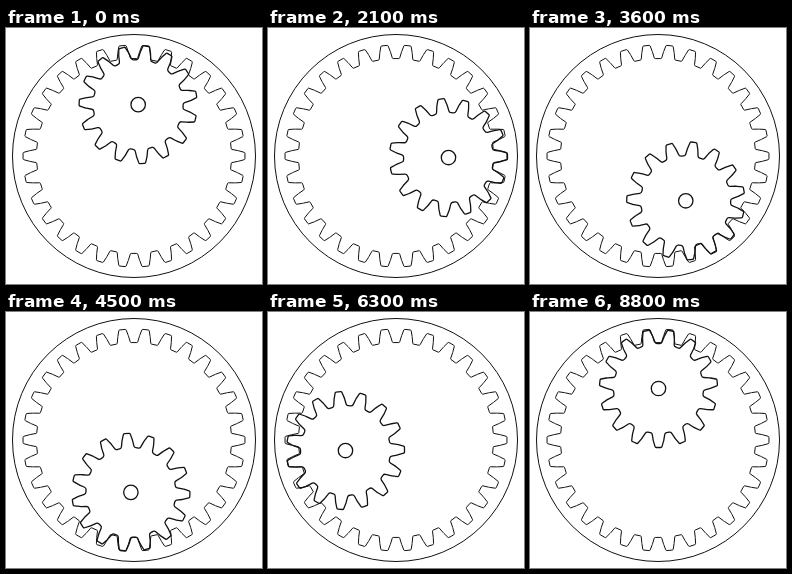
An HTML page with a canvas for the animation above (8900 ms loop, 256 by 256 pixels).

```html
<!DOCTYPE html>
<html lang="en">
<head>
<meta charset="utf-8">
<title>Planet gear in a ring gear</title>
<style>
html, body { margin: 0; width: 100%; height: 100%; overflow: hidden; background: #fff; }
canvas { display: block; width: 256px; height: 256px; }
</style>
</head>
<body>
<canvas id="stage"></canvas>
<script>
const SIZE = 256, MID = 128, ORBIT = 52, ORBIT_MID = 128.5;
const STEP = 100, STEPS = 89, TAU = Math.PI * 2;
const canvas = document.getElementById('stage');
const ctx = canvas.getContext('2d');
const scale = window.devicePixelRatio || 1;
canvas.width = canvas.height = SIZE * scale;

// Each lobe has a base, a middle and a tip: radius, half width and corner rounding.
const RING = {
  count: 30,
  profile: [[97.5, 6.7, 1], [104.5, 5.3, 12], [111, 3.5, 1]]
};
const PLANET = {
  count: 15,
  profile: [[45, 6.5, 2.4], [52.5, 5.2, 12], [59.1, 3.2, 1.2]]
};

// Angles are measured clockwise from the top.
function polar(r, angle) {
  return [r * Math.sin(angle), -r * Math.cos(angle)];
}

function circle(x, y, r) {
  ctx.beginPath();
  ctx.arc(x, y, r, 0, TAU);
  ctx.stroke();
}

function gear(x, y, { count, profile }, turn) {
  const corners = [];
  for (let i = 0; i < count; i++) {
    const axis = turn + i * TAU / count;
    const side = sign => profile.map(([r, half, round]) =>
      [...polar(r, axis + sign * half / r), round]);
    corners.push(...side(-1), ...side(1).reverse());
  }
  ctx.save();
  ctx.translate(x, y);
  ctx.beginPath();
  const first = corners[0], last = corners[corners.length - 1];
  ctx.moveTo((first[0] + last[0]) / 2, (first[1] + last[1]) / 2);
  corners.forEach(([px, py, round], i) => {
    const [nx, ny] = corners[(i + 1) % corners.length];
    ctx.arcTo(px, py, nx, ny, round);
  });
  ctx.closePath();
  ctx.stroke();
  ctx.restore();
}

// Even speed, except for one slow sway in the first half of the loop.
function orbitAngle(step) {
  const phase = (step - 9) / 45;
  const sway = phase > 0 && phase < 1 ? 0.038 * Math.sin(TAU * phase) : 0;
  return (step + 1) * TAU / STEPS + sway;
}

function draw(time) {
  const angle = orbitAngle(Math.floor(time / STEP) % STEPS);
  const [dx, dy] = polar(ORBIT, angle);
  const x = ORBIT_MID + dx, y = ORBIT_MID + dy;

  ctx.setTransform(scale, 0, 0, scale, 0, 0);
  ctx.fillStyle = '#fff';
  ctx.fillRect(0, 0, SIZE, SIZE);
  ctx.strokeStyle = '#111';
  ctx.lineJoin = 'round';

  ctx.lineWidth = 1;
  circle(MID, MID, 121.5);
  gear(MID, MID, RING, TAU / 60);

  ctx.lineWidth = 1.3;
  gear(x, y, PLANET, Math.PI - angle);
  circle(x, y, 7.2);
}

function tick() {
  draw(performance.now());
  requestAnimationFrame(tick);
}
tick();
</script>
</body>
</html>
```
